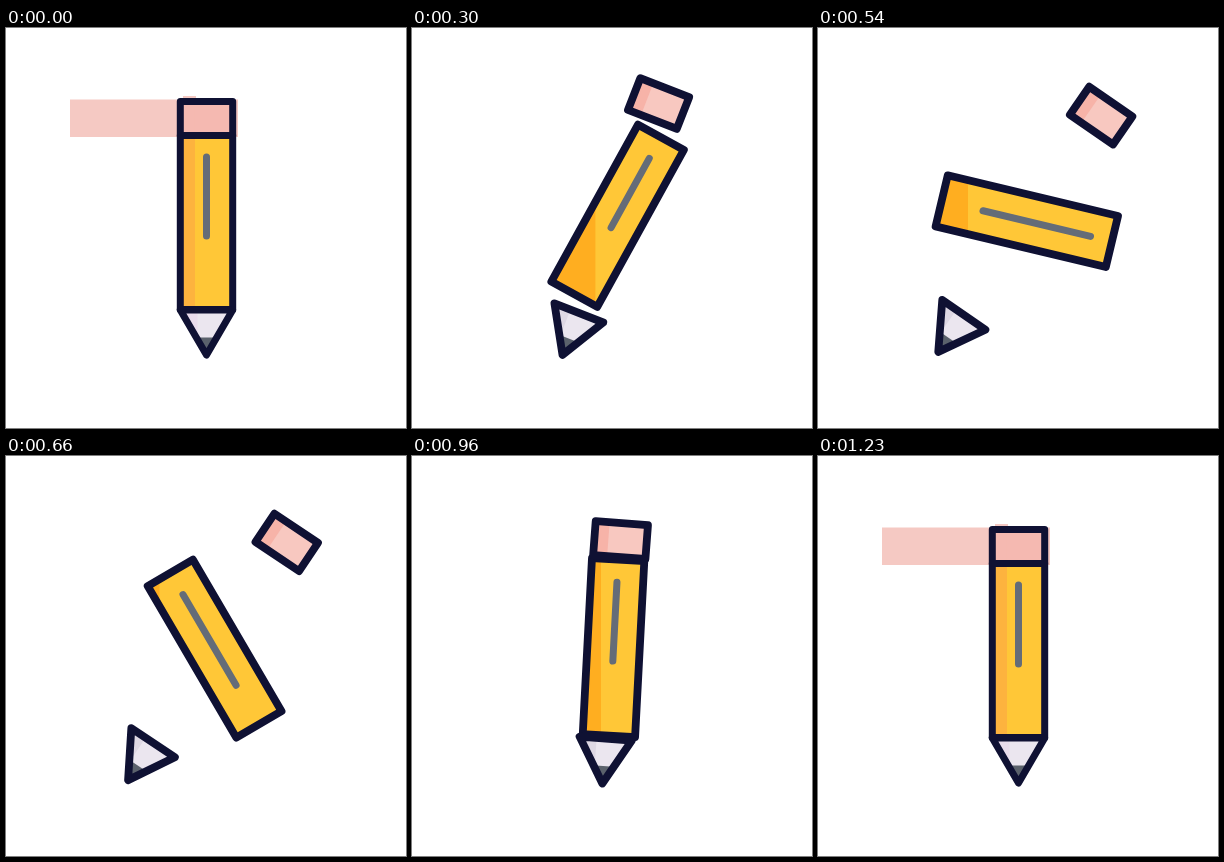
Animation of 400x400 px, one loop 3260 ms. Source, as an HTML page:

```html
<!DOCTYPE html>
<html lang="en">
<head>
<meta charset="utf-8">
<title>Pencil</title>
<style>
  html, body { margin: 0; width: 100%; height: 100%; overflow: hidden; background: #fff; }
  svg { display: block; width: 100%; height: 100%; }
  .line { fill: none; stroke: #0f1133; stroke-width: 7.8; stroke-linejoin: round; }
  .wood { fill: #ffc737; }
  .wood-shade { fill: #ffae20; }
  .rubber { fill: #f8c8c0; }
  .rubber-shade { fill: #f7b3a8; }
  .cone { fill: #ebe6ef; }
  .cone-shade { fill: #ded8e4; }
  .lead { fill: #5b626c; }
  .glow { fill: #f5c9c3; visibility: hidden; }
  .rest .line { stroke-width: 7; }
  .rest .glow { visibility: visible; }
  .rest .wood-shade { fill: #fdb33e; }
  .rest .rubber, .rest .rubber-shade { fill: #f5b9b1; }
  .rest .cone-shade { fill: #e9dcec; }
  #mark { stroke: #646c78; stroke-width: 7; stroke-linecap: round; }
</style>
</head>
<body>
<svg id="stage" viewBox="0 0 400 400">
  <defs>
    <clipPath id="bodyClip"><rect id="clipBox" class="box" x="-26.2" width="52.4"/></clipPath>
    <clipPath id="coneClip"><path d="M-26.2 0H26.2L0 45Z"/></clipPath>
  </defs>

  <path class="glow" d="M64 71.5H177V68H190V71.5H232V109H64Z"/>

  <g id="body">
    <rect class="wood box" x="-26.2" width="52.4"/>
  </g>
  <g clip-path="url(#bodyClip)">
    <rect id="shade" class="wood-shade" height="400"/>
  </g>
  <g id="bodyTop">
    <rect class="line box" x="-26.2" width="52.4"/>
    <line id="mark" x1="0" x2="0"/>
  </g>

  <g id="tip">
    <g clip-path="url(#coneClip)">
      <rect class="cone" x="-27" width="54" height="46"/>
      <rect class="cone-shade" x="-27" width="18" height="46"/>
      <rect class="lead" x="-27" y="27.5" width="54" height="20"/>
    </g>
    <path class="line" d="M-26.2 0H26.2L0 45Z"/>
  </g>

  <g id="eraser">
    <rect class="rubber" x="-26.2" y="-17" width="52.4" height="34"/>
    <rect class="rubber-shade" x="-26.2" y="-17" width="14" height="34"/>
    <rect class="line" x="-26.2" y="-17" width="52.4" height="34"/>
  </g>
</svg>

<script>
const LOOP = 3260, END = 1230, STEP = 30, MID = 200.5, MAX_TILT = 34.6;

// Key points [ms, degrees]: wind up, fly apart, snap back, settle.
const spinKeys = [[0, 0], [150, -5.5], [300, 28.9], [540, 103.4], [780, 179.4], [960, 183], [END, 180]];
const tiltKeys = [[0, 0], [150, -5.7], [300, 21.3], [540, MAX_TILT], [780, 31.6], [960, 4.3], [END, 0]];

// Monotone cubic: flat at the ends and at every turning point.
function slope(keys, i) {
  if (i === 0 || i === keys.length - 1) return 0;
  const rate = j => (keys[j + 1][1] - keys[j][1]) / (keys[j + 1][0] - keys[j][0]);
  const a = rate(i - 1), b = rate(i);
  return a * b <= 0 ? 0 : 2 * a * b / (a + b);
}

function sample(keys, t) {
  let i = 0;
  while (i < keys.length - 2 && t >= keys[i + 1][0]) i++;
  const [t0, v0] = keys[i], [t1, v1] = keys[i + 1];
  const d = t1 - t0, u = (t - t0) / d, w = 1 - u;
  return v0 * w * w * (1 + 2 * u) + v1 * u * u * (3 - 2 * u)
    + d * u * w * (slope(keys, i) * w - slope(keys, i + 1) * u);
}

function smooth(from, to, t) {
  const u = Math.min(1, Math.max(0, (t - from) / (to - from)));
  return u * u * (3 - 2 * u);
}

const el = id => document.getElementById(id);
const set = (node, attrs) => {
  for (const k in attrs) node.setAttribute(k, attrs[k]);
};
const place = (ids, x, y, r) => {
  for (const id of ids) set(el(id), { transform: `translate(${x} ${y}) rotate(${r})` });
};
const boxes = document.querySelectorAll('.box');

function draw(t) {
  const tilt = sample(tiltKeys, t);
  const lift = tilt * (1.69 - 0.0464 * tilt);      // arc of the eraser
  const x = MID + 0.6 * Math.max(0, -tilt);        // small shift in the wind-up

  place(['body', 'bodyTop', 'clipBox'], x + 0.24 * tilt, 194.5 - 0.45 * lift, sample(spinKeys, t));
  place(['eraser'], x + tilt * (1.8 + 0.017 * tilt), 90.5 - lift, tilt);
  place(['tip'], x - 1.58 * tilt, 282 + 0.14 * Math.abs(tilt), tilt);

  const length = 174 + 0.35 * lift;
  for (const box of boxes) set(box, { y: -length / 2, height: length });

  // The mark slides to the far end while the body makes its half turn.
  set(el('mark'), { y1: -65.5 + 52 * smooth(540, 800, t), y2: 13.5 + 52 * smooth(300, 720, t) });

  // The shade keeps an upright edge on the stage.
  set(el('shade'), { width: 189 - 39 * (tilt / MAX_TILT) ** 4 });
  el('stage').classList.toggle('rest', t === 0 || t === END);
}

function tick() {
  const t = performance.now() % LOOP;
  draw(Math.min(END, Math.floor(t / STEP) * STEP));
  requestAnimationFrame(tick);
}
tick();
</script>
</body>
</html>
```
